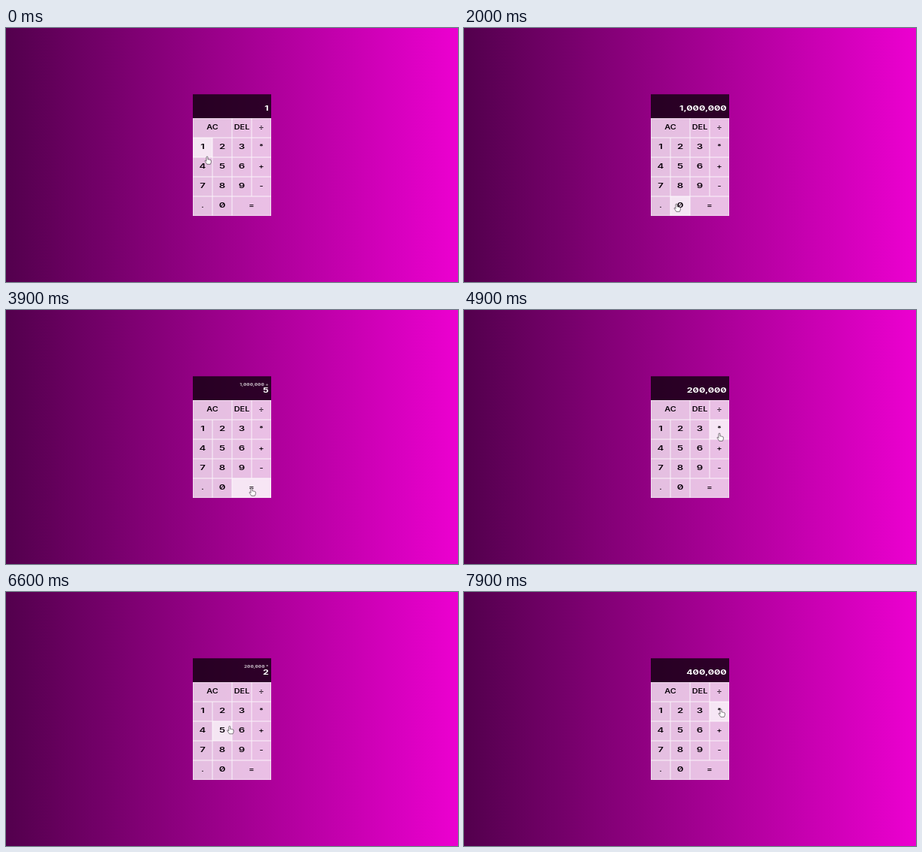
An HTML page that plays this animation: 600x338 px, repeating every 8 s.

```html
<!DOCTYPE html>
<html lang="en">
<head>
<meta charset="utf-8">
<title>Calculator</title>
<style>
  html, body { margin: 0; width: 100%; height: 100%; overflow: hidden; }
  body { background: linear-gradient(to right, #53004d, #ec00d0); }
  svg { display: block; width: 100%; height: 100%; }
  text { font-family: Inter, "DejaVu Sans", sans-serif; font-feature-settings: "zero"; }
  .key { fill: #fff; fill-opacity: .75; }
  .key.hover { fill-opacity: .9; }
  .border { fill: none; stroke: #fff; stroke-width: .5; stroke-opacity: .8; }
  .label { font-size: 8.5px; font-weight: 600; text-anchor: middle; fill: #080008; }
  .screen { fill: #000; fill-opacity: .73; }
  .value { text-anchor: end; fill: #fff; font-weight: 650; }
  #current { font-size: 9.1px; }
  #previous { font-size: 4.8px; fill-opacity: .75; }
  .hand { fill: #fff; stroke: #3a303a; stroke-width: .65; stroke-linejoin: round; }
</style>
</head>
<body>
<svg viewBox="0 0 600 338" preserveAspectRatio="none">
  <rect class="screen" x="248" y="88.2" width="104" height="31.8"/>
  <text id="previous" class="value" transform="translate(348.6 100.8) scale(1.34 1)"></text>
  <text id="current" class="value" transform="translate(348.7 109.9) scale(1.36 1)"></text>
  <g id="keys"></g>
  <path id="cursor" class="hand" d="M-1 1Q-1 0 0 0T1 1V4Q2 3.4 2.6 4.2 3.8 3.6 4.2 4.7 5.3 4.4 5.3 5.6V7.6Q5 9 4.3 10.3H-.2Q-1.5 8.3-2.8 6.4-3.2 5.2-2.2 5.2L-1 6.4Z"/>
</svg>
<script>
const DURATION = 8000, STEP = 100;
const CELL = 26, LEFT = 248, TOP = 120;
const $ = id => document.getElementById(id);

function make(tag, attrs) {
  const node = document.createElementNS("http://www.w3.org/2000/svg", tag);
  for (const name in attrs) node.setAttribute(name, attrs[name]);
  return $("keys").appendChild(node);
}

// A repeated label means one key that spans both columns.
const rows = ["AC AC DEL ÷", "1 2 3 *", "4 5 6 +", "7 8 9 -", ". 0 = ="];
const keys = {};
rows.forEach((row, r) => {
  const labels = row.split(" ");
  labels.forEach((label, c) => {
    if (label === labels[c - 1]) return;
    const width = CELL * (label === labels[c + 1] ? 2 : 1);
    const x = LEFT + c * CELL, y = TOP + r * CELL;
    const node = make("rect", { class: "key", x, y, width, height: CELL });
    make("rect", { class: "border", x: x + .25, y: y + .25, width: width - .5, height: CELL - .5 });
    const stretch = /\d/.test(label) ? 1.55 : 1.28;
    make("text", {
      class: "label",
      transform: `translate(${x + width / 2} ${y + 15.3}) scale(${stretch} 1)`
    }).textContent = label;
    keys[label] = { x, y, width, node };
  });
});

// The pointer's visits, in steps; dx and dy shift it from the key's centre.
const visits = [
  { key: "1", from: 0, dx: 6, dy: 12 },
  { key: "0", from: 2, to: 21, dx: -5, dy: -3, press: Array.from({ length: 6 }, (_, i) => Math.floor(4 + 3.2 * i)) },
  { key: "÷", from: 26, to: 28, press: [27] },
  { key: "6", from: 30, dy: -8 },
  { key: "5", from: 32, to: 35, press: [34] },
  { key: "=", from: 39, to: 41, press: [40] },
  { key: "*", from: 49, dy: 5 },
  { key: "÷", from: 52, dy: 11 },
  { key: "*", from: 54, to: 56, press: [56] },
  { key: "8", from: 59, dy: -8 },
  { key: "0", from: 60, dy: -10 },
  { key: "2", from: 63, to: 65, press: [64] },
  { key: "=", from: 69, to: 72, press: [70] },
  { key: "9", from: 74, dx: 3, dy: -11 },
  { key: "*", from: 79, dx: 2, dy: -3 }
];

const presses = visits.flatMap(({ key, press = [] }) => press.map(at => ({ key, at })));

const operators = { "÷": (a, b) => a / b, "*": (a, b) => a * b };

function calculate(step) {
  let current = "1", previous = "", operator = "";
  for (const { key, at } of presses) {
    if (at > step) break;
    if (key === "=") {
      current = String(operators[operator](+previous, +current));
      previous = operator = "";
    } else if (key in operators) {
      [previous, current, operator] = [current, "", key];
    } else {
      current += key;
    }
  }
  return { current, previous, operator };
}

const format = digits => digits && Number(digits).toLocaleString("en-US");

function place({ key, dx = 0, dy = 0 }) {
  const { x, y, width } = keys[key];
  return [x + width / 2 + dx, y + CELL / 2 + dy];
}

function pointerAt(step) {
  const index = visits.findLastIndex(v => v.from <= step);
  const here = visits[index], next = visits[index + 1];
  const leave = here.to ?? here.from;
  const a = place(here);
  if (!next || step <= leave) return a;
  const b = place(next), k = (step - leave) / (next.from - leave);
  return a.map((v, i) => v + (b[i] - v) * k);
}

function draw(time) {
  const step = Math.floor(time % DURATION / STEP);
  const [x, y] = pointerAt(step);
  $("cursor").setAttribute("transform", `translate(${x} ${y})`);
  for (const key of Object.values(keys)) {
    const inside = x >= key.x && x < key.x + key.width && y >= key.y && y < key.y + CELL;
    key.node.classList.toggle("hover", inside);
  }
  const { current, previous, operator } = calculate(step);
  $("current").textContent = format(current);
  $("previous").textContent = operator && `${format(previous)} ${operator}`;
}

const start = performance.now();
function tick() {
  draw(performance.now() - start);
  requestAnimationFrame(tick);
}
tick();
</script>
</body>
</html>
```
